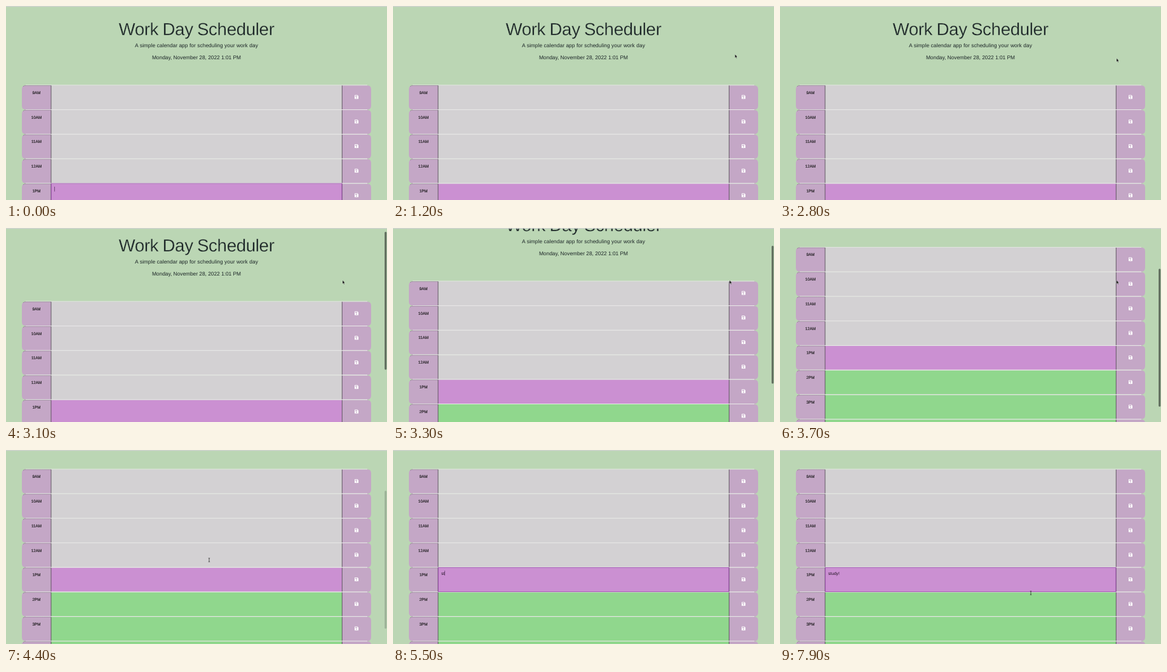
An HTML page for the animation above (8000 ms loop, 600 by 306 pixels).

```html
<!DOCTYPE html>
<html lang="en">
<head>
<meta charset="utf-8">
<title>Work Day Scheduler</title>
<style>
  html, body { margin: 0; width: 100%; height: 100%; overflow: hidden; background: #bbd6b4; }
  svg { display: block; width: 100vw; height: 100vh; }
  text { font-family: "Liberation Sans", Arial, sans-serif; fill: #1c2627; text-rendering: geometricPrecision; }
  .mid { text-anchor: middle; }
  .title { font-size: 27.6px; letter-spacing: -.3px; word-spacing: -1px; stroke: #bbd6b4; stroke-width: .3px; }
  .lead { font-size: 8.33px; }
  .hour { font-size: 6.3px; fill: #111; stroke: #111; stroke-width: .12px; }
  .entry { font-size: 6.67px; fill: #1c101e; }
</style>
</head>
<body>
<svg id="stage" viewBox="0 0 600 306">
  <rect width="600" height="306" fill="#bbd6b4"/>
  <g id="page">
    <text class="mid title" x="300" y="46">Work Day Scheduler</text>
    <text class="mid lead" x="300" y="65.2" letter-spacing=".07">A simple calendar app for scheduling your work day</text>
    <text class="mid lead" x="300" y="84.2">Monday, November 28, 2022 1:01 PM</text>
    <g id="rows"></g>
    <rect id="focus" x="71.3" width="457.7" fill="none" stroke="#a352b4" stroke-width=".9"/>
    <text id="entry" class="entry" x="76"></text>
    <rect id="caret" width=".6" height="7.6" fill="#40204a"/>
  </g>
  <rect width="600" height="1.2" fill="#cfd2d0"/>
  <rect id="bar" x="596.3" width="3" height="217.5" rx="1.5" fill="#5d6a5b"/>
  <path id="arrow" d="M0 0V5.6L1.3 4.5L2.2 6.4L3.1 6L2.2 4.1H3.9Z" fill="#111" stroke="#e8efe6" stroke-width=".35"/>
  <path id="beam" d="M-1.2 -3Q0 -3 0 -2.2Q0 -3 1.2 -3M0 -2.2V2.2M-1.2 3Q0 3 0 2.2Q0 3 1.2 3" fill="none" stroke="#1d1d1d" stroke-width=".7"/>
</svg>
<script>
const LOOP = 8000, STEP = 100;
const TOP = 125, PITCH = 38.75, NOW = 4;
const hours = ["9AM", "10AM", "11AM", "12AM", "1PM", "2PM", "3PM", "4PM", "5PM"];
const $ = id => document.getElementById(id);
const rowTop = i => TOP + i * PITCH;

function rowMarkup(label, i) {
  const fill = i < NOW ? "#d3d1d3" : i === NOW ? "#cb90d2" : "#90d78d";
  const h = PITCH - .5, mauve = "#c4a7c6";
  return `<g transform="translate(0 ${rowTop(i)})">
    <path d="M71 .2H31Q25 .2 25 6.2V${h - 6}Q25 ${h} 31 ${h}H71Z" fill="${mauve}"/>
    <path d="M529 .2H569Q575 .2 575 6.2V${h - 6}Q575 ${h} 569 ${h}H529Z" fill="${mauve}"/>
    <rect x="71" y=".2" width="458" height="${h - .2}" fill="${fill}"/>
    <path d="M31 -.2H569M31 ${PITCH - .2}H569" stroke="#e9e8e8" stroke-width=".9"/>
    <path d="M27 2Q28.5 .5 31 .5H71" fill="none" stroke="#5d4d60" stroke-width=".6" stroke-dasharray="1.25 .83"/>
    <path d="M71 .4V${h}M529.3 .4V${h}" stroke="#4b434c" stroke-width=".8"/>
    <text class="mid hour" x="48" y="13.9">${label}</text>
    <g transform="translate(549 15.6)">
      <path d="M.6 0H4.5L6 1.5V5.4Q6 6 5.4 6H.6Q0 6 0 5.4V.6Q0 0 .6 0Z" fill="#fff"/>
      <path d="M.9 .9H4.2V2.3H.9Z" fill="${mauve}"/>
      <circle cx="3" cy="4.1" r=".9" fill="${mauve}"/>
    </g>
  </g>`;
}
$("rows").innerHTML = hours.map(rowMarkup).join("");
$("focus").setAttribute("y", rowTop(NOW));
$("focus").setAttribute("height", PITCH - .6);
$("entry").setAttribute("y", rowTop(NOW) + 12);
$("caret").setAttribute("y", rowTop(NOW) + 5);

// Linear track through [time, value] points
function track(points, t) {
  if (t <= points[0][0]) return points[0][1];
  for (let i = 1; i < points.length; i++) {
    const [a, u] = points[i - 1], [b, v] = points[i];
    if (t <= b) return u + (v - u) * (t - a) / (b - a);
  }
  return points[points.length - 1][1];
}
const ease = p => p * p * (3 - 2 * p);

const scrollKeys = [[2900, 0], [3000, 2], [3100, 9], [3200, 23], [3300, 41], [3400, 66],
                    [3500, 84], [3600, 91.5], [3700, 94.4], [3800, 94.6]];
const keystrokes = [5200, 5500, 5600, 5800, 6000, 7400];
const mouseLegs = [
  [100, 800, 330, 292, 544, 72],
  [900, 1600, 544, 72, 530, 82.5],
  [3900, 4600, 530, 82.5, 268, 196]
];

function mouseAt(t) {
  let x = 330, y = 292;
  for (const [a, b, x0, y0, x1, y1] of mouseLegs) {
    if (t < a) break;
    const p = ease(Math.min(1, (t - a) / (b - a)));
    x = x0 + (x1 - x0) * p;
    y = y0 + (y1 - y0) * p;
  }
  return t >= 7900 ? [395, 225.5] : [x, y];
}

function show(el, on) { el.setAttribute("opacity", +on); }

function draw(t) {
  const scroll = track(scrollKeys, t);
  $("page").setAttribute("transform", `translate(0 ${-scroll})`);

  $("bar").setAttribute("y", scroll * .68);
  show($("bar"), t < 3000 ? 0 : track([[4200, 1], [4500, 0]], t));

  show($("focus"), t < 800 || t >= 4700);
  $("entry").textContent = "study!".slice(0, keystrokes.filter(k => t >= k).length);
  const width = $("entry").textContent ? $("entry").getComputedTextLength() : 0;
  $("caret").setAttribute("x", 76 + width);
  const blinkOff = (t >= 6600 && t < 7000) || t >= 7900;
  show($("caret"), t < 500 || (t >= 4700 && !blinkOff));

  const [x, y] = mouseAt(t);
  const visible = (t >= 100 && t < 5200) || t >= 7900;
  const overText = x > 71 && x < 529 && y + scroll > TOP;
  for (const id of ["arrow", "beam"]) {
    $(id).setAttribute("transform", `translate(${x} ${y})`);
    show($(id), visible && overText === (id === "beam"));
  }
}

const start = performance.now();
function tick() {
  const t = (performance.now() - start) % LOOP;
  draw(Math.floor(t / STEP) * STEP);
  requestAnimationFrame(tick);
}
tick();
</script>
</body>
</html>
```
